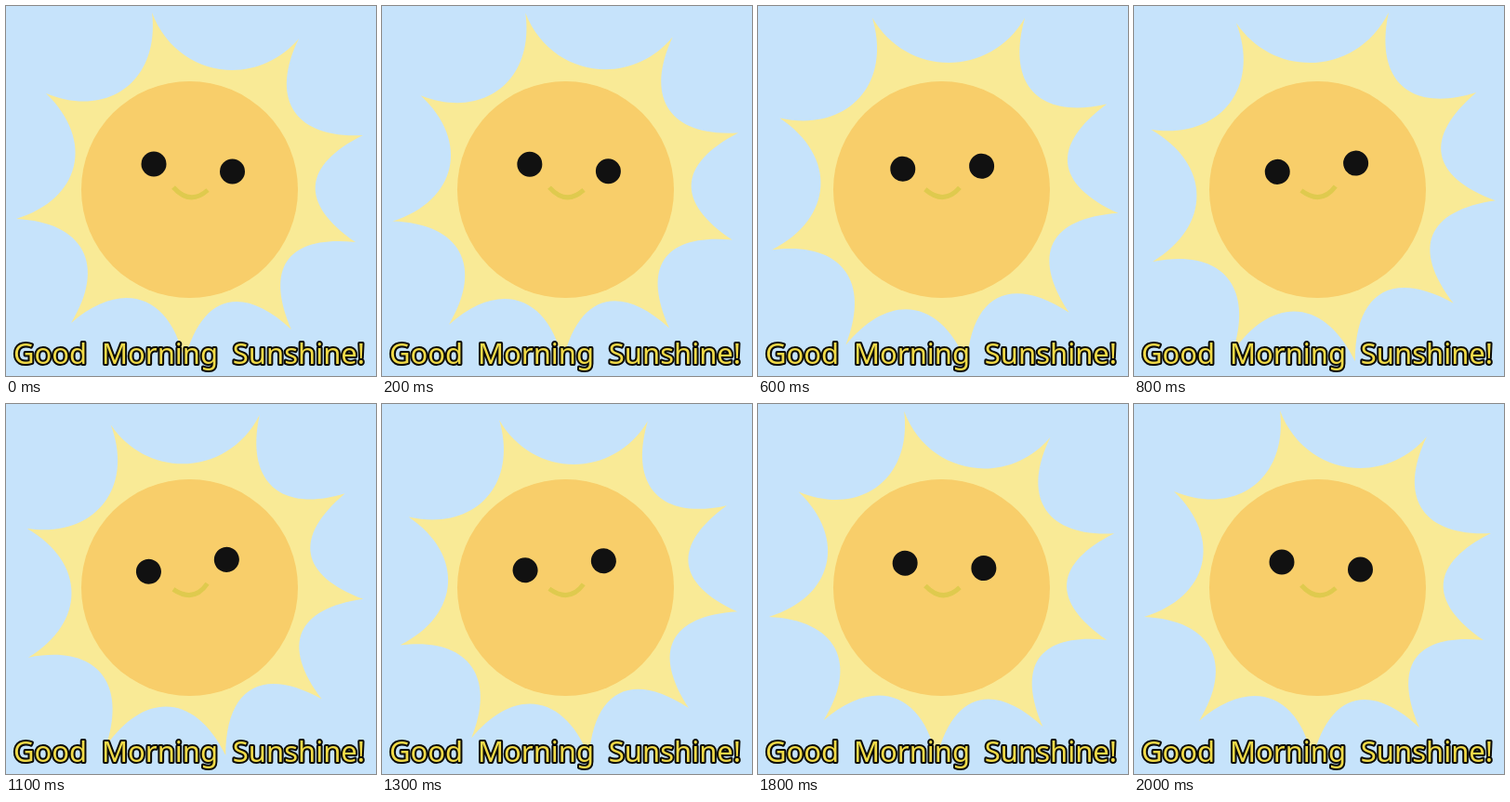
An HTML page that plays this animation: 398 px wide and 398 px high, repeating every 2100 ms.

```html
<!DOCTYPE html>
<html lang="en">
<head>
<meta charset="utf-8">
<title>Good Morning Sunshine!</title>
<style>
  html, body { margin: 0; width: 100%; height: 100%; overflow: hidden; background: #c6e3fb; }
  svg { display: block; width: 100%; height: 100%; }
  text {
    font: 500 31px "Noto Sans", "Open Sans", sans-serif;
    text-anchor: middle;
    fill: #f0da48;
    stroke: #0b0b08;
    stroke-width: 4px;
    stroke-linejoin: round;
    paint-order: stroke;
  }
</style>
</head>
<body>
<svg viewBox="0 0 398 398">
  <rect width="398" height="398" fill="#c6e3fb"/>
  <path id="rays" fill="#f9ea96"/>
  <circle cx="197.5" cy="197.5" r="116.5" fill="#f8ce6a"/>
  <g id="face">
    <circle cx="159" cy="170" r="13.5" fill="#111"/>
    <circle cx="243.5" cy="178" r="13.5" fill="#111"/>
    <path d="M180 195Q198 215 217 198" fill="none" stroke="#dfca4e" stroke-width="5"/>
  </g>
  <text x="47.5" y="385">Good</text>
  <text x="165.5" y="385">Morning</text>
  <text x="315" y="385">Sunshine!</text>
</svg>
<script>
const LOOP = 2100, STEP = 100, CENTER = 197.5;
const rays = document.getElementById('rays');
const face = document.getElementById('face');

// Ray tips, clockwise.
const tips = [
  [157, 7], [315, 35], [384, 139], [376, 254], [307, 348],
  [192, 382], [70, 341], [11, 229], [43, 94]
];

// Every hollow leaves both of its tips at the same angle to the line between them.
function hollow([x0, y0], [x1, y1]) {
  const along = 37, inward = 63;
  const length = Math.hypot(x1 - x0, y1 - y0);
  const ux = (x1 - x0) / length, uy = (y1 - y0) / length;
  const control = (x, y, side) =>
    `${x + side * along * ux - inward * uy} ${y + side * along * uy + inward * ux}`;
  return `C${control(x0, y0, 1)} ${control(x1, y1, -1)} ${x1} ${y1}`;
}

rays.setAttribute('d', `M${tips[0]}` +
  tips.map((tip, i) => hollow(tip, tips[(i + 1) % tips.length])).join('') + 'Z');

// Eases from 0 to 1 and back within the given time span, 0 outside it.
function swing(t, start, end) {
  const u = (t - start) / (end - start);
  return u > 0 && u < 1 ? Math.sin(Math.PI * u) ** 2 : 0;
}

function pose(el, angle, scale = 1) {
  el.setAttribute('transform',
    `translate(${CENTER} ${CENTER}) rotate(${angle}) scale(${scale}) translate(${-CENTER} ${-CENTER})`);
}

function draw(now) {
  let t = Math.floor((now % LOOP) / STEP) * STEP;
  if (t === 1500) t = 1400; // this pose is held for two steps
  const size = 1 + 0.028 * swing(t, 300, 1100) - 0.011 * swing(t, 1100, 2000);
  pose(rays, -15 * swing(t, 70, 1815), size);
  pose(face, -14.2 * swing(t, 110, 2020));
}

let start;
function tick(now) {
  start ??= now;
  draw(now - start);
  requestAnimationFrame(tick);
}
draw(0);
requestAnimationFrame(tick);
</script>
</body>
</html>
```
